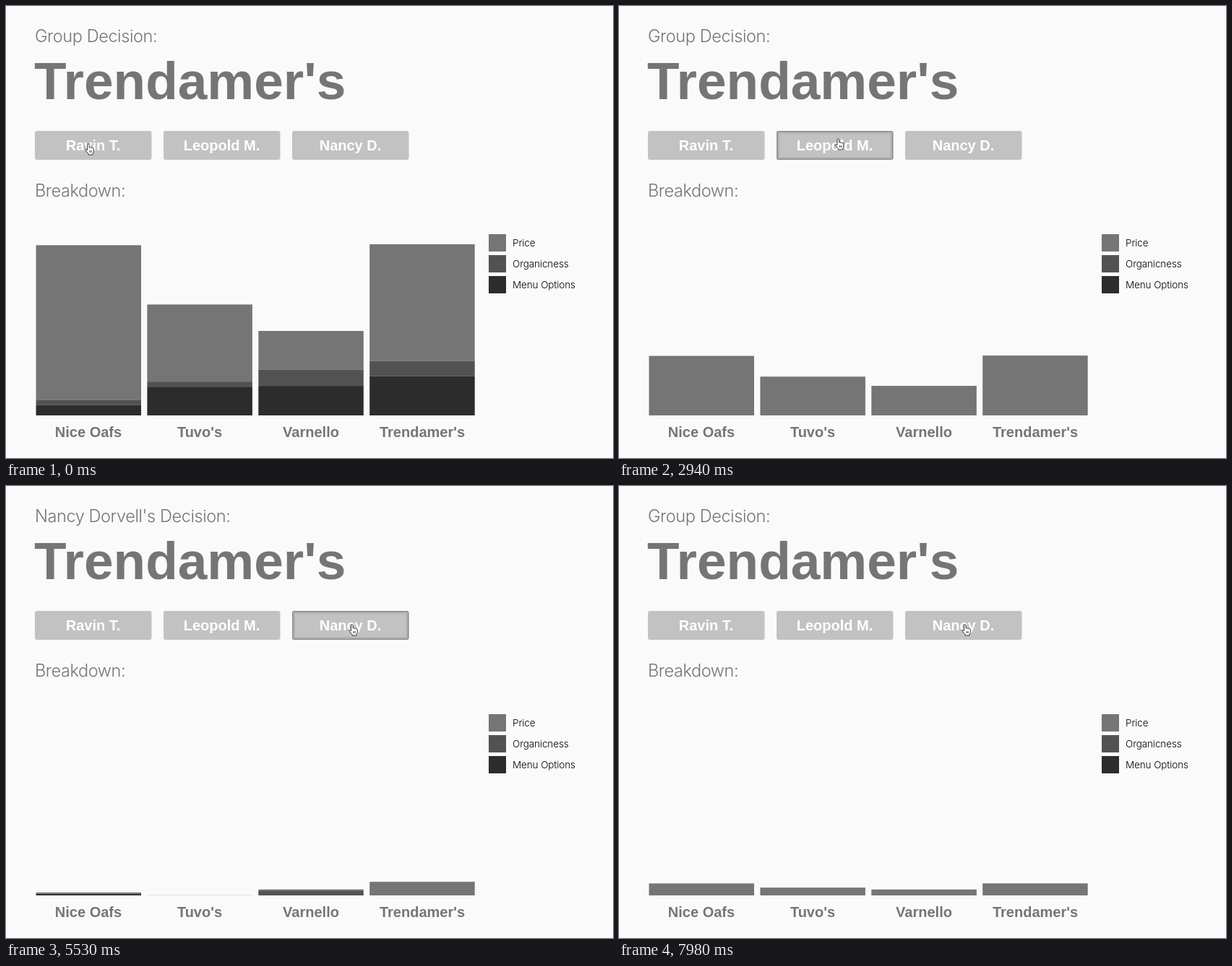
Animation, 840 px wide and 626 px high, one loop 8000 ms. Source, as an HTML page:

```html
<!DOCTYPE html>
<html lang="en">
<head>
<meta charset="utf-8">
<title>Group decision</title>
<style>
  html, body { margin: 0; width: 100%; height: 100%; overflow: hidden; background: #fafafa; }
  svg { display: block; }
  text { fill: #757575; font: bold 20px "Liberation Sans", Arial, sans-serif; }
  .mid { text-anchor: middle; }
  .light { font: 300 23.5px Inter, "Liberation Sans", sans-serif; letter-spacing: -.4px; }
  .key { font: 300 13.5px Inter, "Liberation Sans", sans-serif; letter-spacing: -.1px; fill: #000; }
  #title { font-size: 73px; }
  .ring rect { fill: none; stroke: #8e8e8e; stroke-width: 1.5; }
</style>
</head>
<body>
<svg width="840" height="626" viewBox="0 0 840 626">
  <text id="heading" class="light" x="40" y="50"></text>
  <text id="title" x="39" y="129"></text>
  <g id="buttons"></g>
  <text class="light" x="40" y="264">Breakdown:</text>
  <g id="bars"></g>
  <g id="labels"></g>
  <g id="legend"></g>
  <path id="hand" fill="#fff" stroke="#3a3a3a" stroke-linejoin="round"
    d="M4 10V2.2a1.3 1.3 0 0 1 2.6 0V6q1.2-.8 2.2 .3q1.2-.6 2 .4q1.8-.4 2 1.2V11q0 2-1.2 3.2V16H5.5V14.5L1.2 9.6q-.4-1.6 1.2-1.3zM7.5 10v3M9.5 10v3"/>
</svg>
<script>
const LOOP = 8000, STEP = 70, RISE = 720, FADE = 280;
const BASE = 567, TALLEST = 237;
const SHADES = ['#757575', '#525252', '#2c2c2c'];
const KEYS = ['Price', 'Organicness', 'Menu Options'];
const PLACES = ['Nice Oafs', "Tuvo's", 'Varnello', "Trendamer's"];

const el = id => document.getElementById(id);
const sum = list => list.reduce((a, b) => a + b);
const clamp = v => Math.max(0, Math.min(1, v));
const swing = p => .5 - .5 * Math.cos(Math.PI * clamp(p));
const easeOut = p => 1 - (1 - clamp(p)) ** 2;
const rect = (x, y, w, h, more = '') =>
  `<rect x="${x}" y="${y}" width="${w}" height="${h}" ${more}/>`;

// Scales the bars so that the winner reaches full height
function verdict(who, bars) {
  const totals = bars.map(sum);
  const best = Math.max(...totals);
  return { who, winner: PLACES[totals.indexOf(best)],
    bars: bars.map(bar => bar.map(h => h / best * TALLEST)) };
}

// Ratings hold one digit per key for each place; a zero still leaves a hairline
function person(button, name, share, weights, ratings) {
  const bars = ratings.split(' ').map(digits =>
    weights.map((w, k) => w * Math.max(digits[k], .008)));
  return { button, share, ...verdict(name + "'s", bars) };
}

const people = [
  person('Ravin T.', 'Ravin Talure', .505, [106, 0, 27], '100 201 101 002'),
  person('Leopold M.', 'Leopold Marvin-Tesley', .71, [75.7, 9.8, 18.5], '310 012 011 231'),
  person('Nancy D.', 'Nancy Dorvell', .29, [187, 53, 49.5], '001 000 011 101')
];
const [ravin, leopold, nancy] = people;
const group = verdict('Group', PLACES.map((_, i) => KEYS.map((_, k) =>
  sum(people.map(p => p.share * p.bars[i][k])))));

// A first click falls back to the group, a second one picks the next person
const scenes = [[-RISE, group], [903, ravin], [2650, group], [3019, leopold],
  [5030, group], [5399, nancy], [7857, group]];
const presses = [903, 2650, 5030, 7280];
const hops = [[1890, 2170, 298, 183], [4060, 4410, 431, 206], [4480, 4690, 473.5, 191]];

el('buttons').innerHTML = people.map((p, i) => {
  const x = 40 + 178 * i;
  const lines = [1, 2, 3].map(n => {
    const d = 1.3 * n - .5;
    return rect(x + d, 173 + d, 161.5 - 2 * d, 40 - 2 * d, `rx="2" stroke-opacity="${1 / n ** 1.4}"`);
  }).join('');
  return rect(x, 173, 161.5, 40, 'rx="3" fill="#c2c2c2"') + `<g class="ring">${lines}</g>` +
    `<text class="mid" x="${x + 80.5}" y="199.5" style="fill:#fff">${p.button}</text>`;
}).join('');
const rings = document.querySelectorAll('.ring');

el('labels').innerHTML = PLACES.map((name, i) =>
  `<text class="mid" x="${114 + 154 * i}" y="597">${name}</text>`).join('');

el('legend').innerHTML = KEYS.map((name, k) =>
  rect(668, 316 + 29 * k, 24, 24, `fill="${SHADES[k]}"`) +
  `<text class="key" x="701" y="${332.5 + 29 * k}">${name}</text>`).join('');

// The stack slides up from behind the baseline
function drawBar(parts, i, grown) {
  let y = BASE - grown * sum(parts);
  return parts.map((h, k) => {
    const top = y;
    y += h;
    const shown = Math.min(y, BASE) - top;
    return shown > 0 ? rect(41.5 + 153.9 * i, top, 145.5, shown, `fill="${SHADES[k]}"`) : '';
  }).join('');
}

function draw(t) {
  const [start, scene] = scenes.filter(s => s[0] <= t).pop();
  const grown = swing((t - start) / RISE);
  el('heading').textContent = scene.who + ' Decision:';
  el('title').textContent = scene.winner;
  el('bars').innerHTML = scene.bars.map((bar, i) => drawBar(bar, i, grown)).join('');

  rings.forEach((ring, i) => ring.setAttribute('opacity',
    t < presses[i] ? 0 : 1 - clamp((t - presses[i + 1]) / FADE)));

  let x = 108.5, y = 190;
  for (const [from, to, tx, ty] of hops) {
    const p = easeOut((t - from) / (to - from));
    x += (tx - x) * p;
    y += (ty - y) * p;
  }
  el('hand').setAttribute('transform', `translate(${x} ${y})`);
}

let last = -1;
function tick() {
  const t = Math.floor(performance.now() % LOOP / STEP) * STEP;
  if (t !== last) draw(last = t);
  requestAnimationFrame(tick);
}
tick();
</script>
</body>
</html>
```
